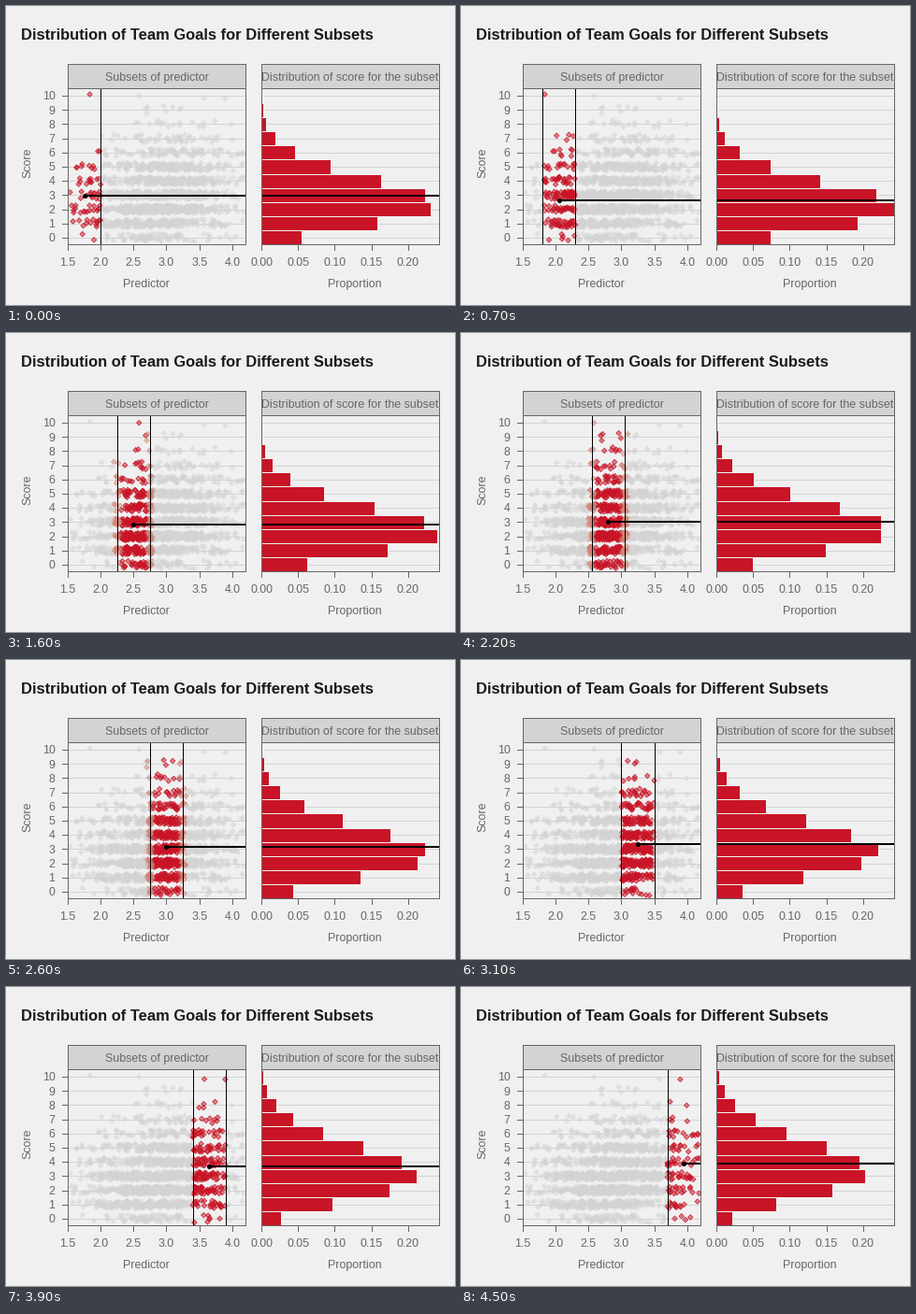
Animation of 480x320 px, one loop 5.6 s. Source, as a matplotlib script:

```python
import math

import numpy as np
import matplotlib as mpl
import matplotlib.pyplot as plt
from matplotlib.animation import FuncAnimation
from matplotlib.colors import to_rgb
from matplotlib.patches import Rectangle

W, H, DPI = 480, 320, 100
PT = 72 / DPI
BG, GREY, RED = "#f0f0f0", "#d3d3d3", "#c81426"
FADE, INK = "#d18376", "#666666"
TOP, STRIP, BOTTOM = 62.5, 88.5, 255.5
LEFT, RIGHT = (66.5, 256.5), (273.5, 463.5)
STEPS, LAST = 56, 45
SCORES = range(11)
RAMP = np.array([to_rgb(c) for c in (GREY, FADE, RED)])

mpl.rcParams["font.family"] = "Liberation Sans"


def px(v):
    return 66.5 + (v - 1.5) * 70.3


def py(score):
    return 248.4 - 15.18 * score


def bx(share):
    return 273.5 + 784 * share


def mean_at(state):
    """Mean score; it dips early, then rises with the predictor."""
    return np.interp(state, [0, 3, 7.5, 22], [2.91, 2.6, 2.78, 3.85])


def poisson(k, mean):
    return math.exp(-mean) * mean ** k / math.factorial(k)


def make_points(n=1600):
    rng = np.random.default_rng(12)
    x = rng.normal(2.9, 0.55, n)
    x = x[(x > 1.51) & (x < 4.19)]
    score = rng.poisson(mean_at((x - 1.75) * 10))
    return x, score + rng.uniform(-0.28, 0.28, len(x))


def state_of(i):
    """Window position: the first step takes three frames, the others two."""
    i = min(i, LAST)
    return i / 3 if i < 3 else (i - 1) / 2


def inside(x, state):
    low = 1.5 + 0.1 * state
    return ((x >= low) & (x <= low + 0.5)).astype(float)


fig = plt.figure(figsize=(W / DPI, H / DPI), dpi=DPI, facecolor=BG)
ax = fig.add_axes([0, 0, 1, 1])
# Half a pixel of offset makes lines snap to the pixel they fall in
ax.set_xlim(0.5, W + 0.5)
ax.set_ylim(H + 0.5, 0.5)
ax.axis("off")


def line(xs, ys, color, width=1, z=1):
    return ax.plot(xs, ys, color=color, lw=width * PT, zorder=z,
                   antialiased=False, solid_capstyle="butt")[0]


def box(x0, x1, y0, y1, fill="none", edge="none", z=1):
    patch = Rectangle((x0, y0), x1 - x0, y1 - y0, facecolor=fill,
                      edgecolor=edge, lw=PT, zorder=z, antialiased=False)
    return ax.add_patch(patch)


def text(x, y, s, ha="center", va="baseline", size=12.4, color=INK, **kw):
    ax.text(x, y, s, ha=ha, va=va, fontsize=size * PT, color=color,
            zorder=9, **kw)


def draw_frame():
    text(16.5, 37, "Distribution of Team Goals for Different Subsets", "left",
         size=16.47, color="#1a1a1a", weight="bold")
    titles = ("Subsets of predictor", "Distribution of score for the subset")
    for (x0, x1), title in zip((LEFT, RIGHT), titles):
        for k in SCORES:
            line([x0, x1], [py(k)] * 2, GREY)
        box(x0, x1, TOP, STRIP, GREY, INK, 8)
        box(x0, x1, STRIP, BOTTOM, edge=INK, z=8)
        text((x0 + x1) / 2, 81, title)
    for k in SCORES:
        line([60, 66], [py(k)] * 2, INK)
        text(53, py(k) + 4.3, str(k), "right")
    ticks = [(px(v), f"{v:.1f}") for v in np.arange(1.5, 4.1, 0.5)]
    ticks += [(bx(v), f"{v:.2f}") for v in np.arange(0, 0.21, 0.05)]
    for x, label in ticks:
        line([x, x], [256, 262], INK)
        text(x, 279, label)
    text(150, 302, "Predictor")
    text(373.5, 302, "Proportion")
    text(23.5, 168.5, "Score", va="center", rotation=90)


draw_frame()
X, Y = make_points()
dots = ax.scatter(px(X), py(Y), s=(3.9 * PT) ** 2, marker="D",
                  linewidths=0.8 * PT, zorder=3)
dots.set_clip_path(box(*LEFT, STRIP, BOTTOM))
bars = [box(RIGHT[0], RIGHT[0], py(k + 0.5), py(k - 0.5), RED, BG, 3)
        for k in SCORES]
edges = [line([0, 0], [STRIP, BOTTOM], "black", z=5) for _ in range(2)]
mean_left = line(LEFT, [0, 0], "black", 2, 6)
mean_right = line(RIGHT, [0, 0], "black", 2, 6)
mean_dot = ax.scatter([0], [0], s=(5 * PT) ** 2, color="black", lw=0, zorder=7)


def paint_dots(state):
    a = np.floor(state)
    t = state - a
    w = (1 - t) * inside(X, a) + t * inside(X, a + 1)
    rgb = np.column_stack([np.interp(w, [0, 0.5, 1], c) for c in RAMP.T])
    dots.set_facecolor(np.column_stack([rgb, np.full(len(w), 0.5)]))
    dots.set_edgecolor(np.column_stack([rgb, 0.5 + 0.35 * w]))


def update(i):
    state = state_of(i)
    paint_dots(state)
    mean = mean_at(state)
    for k, bar in enumerate(bars):
        bar.set_width(min(bx(poisson(k, mean)), RIGHT[1]) - RIGHT[0])
    low = 1.5 + 0.1 * state
    for edge, v in zip(edges, (low, low + 0.5)):
        edge.set_xdata([px(v)] * 2)
    mid, y = px(low + 0.25), py(mean) - 0.5
    mean_left.set_data([mid, LEFT[1]], [y, y])
    mean_right.set_ydata([y, y])
    mean_dot.set_offsets([[mid, y]])
    return [dots, *bars, *edges, mean_left, mean_right, mean_dot]


anim = FuncAnimation(fig, update, frames=STEPS, interval=100, repeat=True,
                     repeat_delay=0, init_func=lambda: update(0))
plt.show()
```
